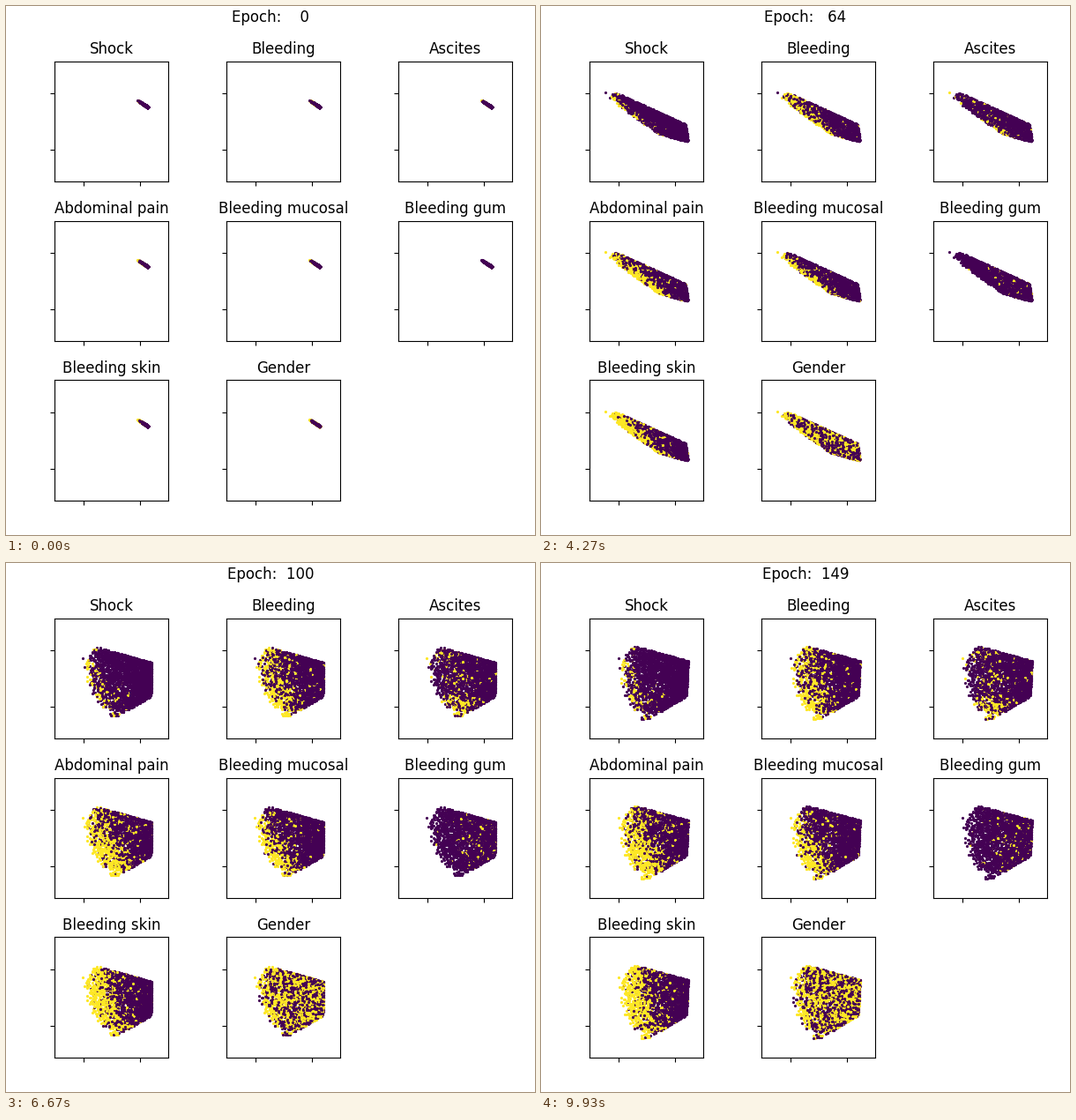
These frames come from a looping animation (600x600 px, 9990 ms). A matplotlib script:

```python
import numpy as np
import matplotlib.pyplot as plt
from matplotlib.animation import FuncAnimation

SIZE, EPOCHS, LOOP_MS = 600, 150, 9990
POINTS, LAYERS = 2700, 8
PURPLE, YELLOW = "#440154", "#fde725"

# First panel's box and the panel spacing, in stage pixels.
LEFT, RIGHT, TOP, BOTTOM = 55, 184, 62.55, 199.2
STEP_X, STEP_Y = 195, 180.96

# Outlines in the first panel: top left, top right, bottom right, bottom left.
WEDGE = np.array([(71, 95), (157, 121), (163, 152), (140, 162)])
CLOUD = np.array([(88, 89), (167, 111), (165, 151), (110, 184)])


def ramp(t, start, end):
    return np.clip((t - start) / (end - start), 0, 1)


def mix(p, q, t):
    return (1 - t) * np.asarray(p) + t * np.asarray(q)


def step(z):
    return 1 / (1 + np.exp(-z))


def strip(epoch):
    """A thin band that grows out of a small seed, then tilts a little."""
    grow, tilt = ramp(epoch, 0, 28) ** 1.5, ramp(epoch, 26, 45)
    tail = mix((148.5, 106.5), mix((64, 66), (58, 82), tilt), grow)
    head = mix((161, 114), mix((183, 153), (172, 150), tilt), ramp(epoch, 0, 14))
    along = head - tail
    across = np.array([-along[1], along[0]]) / np.hypot(*along)
    side = (1 + 4.5 * grow) * across
    return np.array([tail, head, tail + 1.02 * along + side, tail + 0.52 * along + side])


def outline(epoch):
    """Strip, opening into a wedge, relaxing into the settled cloud."""
    opening = ramp(epoch, 45, 80)
    settling = 1 - (1 - ramp(epoch, 80, EPOCHS - 1)) ** 5
    return mix(mix(strip(epoch), WEDGE, opening), CLOUD, settling)


def make_latents(rng):
    """Places across (a) and down (b), with a ragged, bulging left side."""
    b = rng.random(POINTS) ** 1.1
    edge = 0.18 - 0.28 * np.sin(np.pi * b)
    reach = np.clip(rng.normal(0.93, 0.08, POINTS), 0.6, 1.08)
    a = 1 - rng.random(POINTS) ** 1.2 * (1 - edge) * reach
    return a, b


def chances(a, b):
    """Chance of a positive label at each latent place."""
    def west(edge, soft=0.06):
        return step((edge - a) / soft)

    def south(edge):
        return step((b - edge) / 0.06)

    tip = west(0.45) * south(0.72)
    return {
        "Shock": 0.45 * west(0.08) + 0.12 * west(0.45) * south(0.6),
        "Bleeding": 0.04 + 0.6 * west(0.32, 0.1) + 0.25 * tip,
        "Ascites": 0.03 + 0.13 * west(0.6) + 0.4 * tip,
        "Abdominal pain": 0.06 + 0.14 * west(0.75) + 0.64 * west(0.1 + 0.4 * b),
        "Bleeding mucosal": 0.03 + 0.07 * west(0.55) + 0.7 * west(0.03 + 0.4 * b),
        "Bleeding gum": 0.02 + 0.08 * (1 - west(0.35)),
        "Bleeding skin": 0.02 + 0.1 * west(0.78) + 0.78 * west(0.36),
        "Gender": 0.55 + 0.24 * west(0.12) - 0.3 * west(0.5) * south(0.85),
    }


def make_panel(index, title):
    row, col = divmod(index, 3)
    ax = fig.add_axes([
        (LEFT + STEP_X * col) / SIZE,
        1 - (BOTTOM + STEP_Y * row) / SIZE,
        (RIGHT - LEFT) / SIZE,
        (BOTTOM - TOP) / SIZE,
    ])
    ax.set(xlim=(LEFT, RIGHT), ylim=(BOTTOM, TOP), xticks=[88, 152], yticks=[99, 163])
    ax.tick_params(labelbottom=False, labelleft=False)
    ax.set_title(title, fontsize=12)
    return ax


plt.rcParams["font.family"] = "DejaVu Sans"
fig = plt.figure(figsize=(6, 6), dpi=100, facecolor="white")
heading = fig.text(0.5, 1 - 4.17 / SIZE, "", ha="center", va="top", fontsize=12)

rng = np.random.default_rng(4)
A, B = make_latents(rng)
WEIGHTS = np.array([(1 - A) * (1 - B), A * (1 - B), A * B, (1 - A) * B])

# Alternating yellow and purple layers keep the two colours mixed in depth.
layer = np.arange(POINTS) * LAYERS // POINTS
dots = []
for n, (name, chance) in enumerate(chances(A, B).items()):
    panel = make_panel(n, name)
    positive = rng.random(POINTS) < chance
    for k in range(LAYERS):
        for color, members in ((YELLOW, positive), (PURPLE, ~positive)):
            (line,) = panel.plot([], [], "o", color=color, ms=2.3, mew=0)
            dots.append((line, np.flatnonzero(members & (layer == k))))


def draw(epoch):
    places = outline(epoch).T @ WEIGHTS
    for line, members in dots:
        line.set_data(*places[:, members])
    heading.set_text(f"Epoch: {epoch:4d}")
    return [heading] + [line for line, _ in dots]


anim = FuncAnimation(fig, draw, frames=EPOCHS, interval=LOOP_MS / EPOCHS,
                     repeat=True, repeat_delay=0, blit=False)
plt.show()
```
